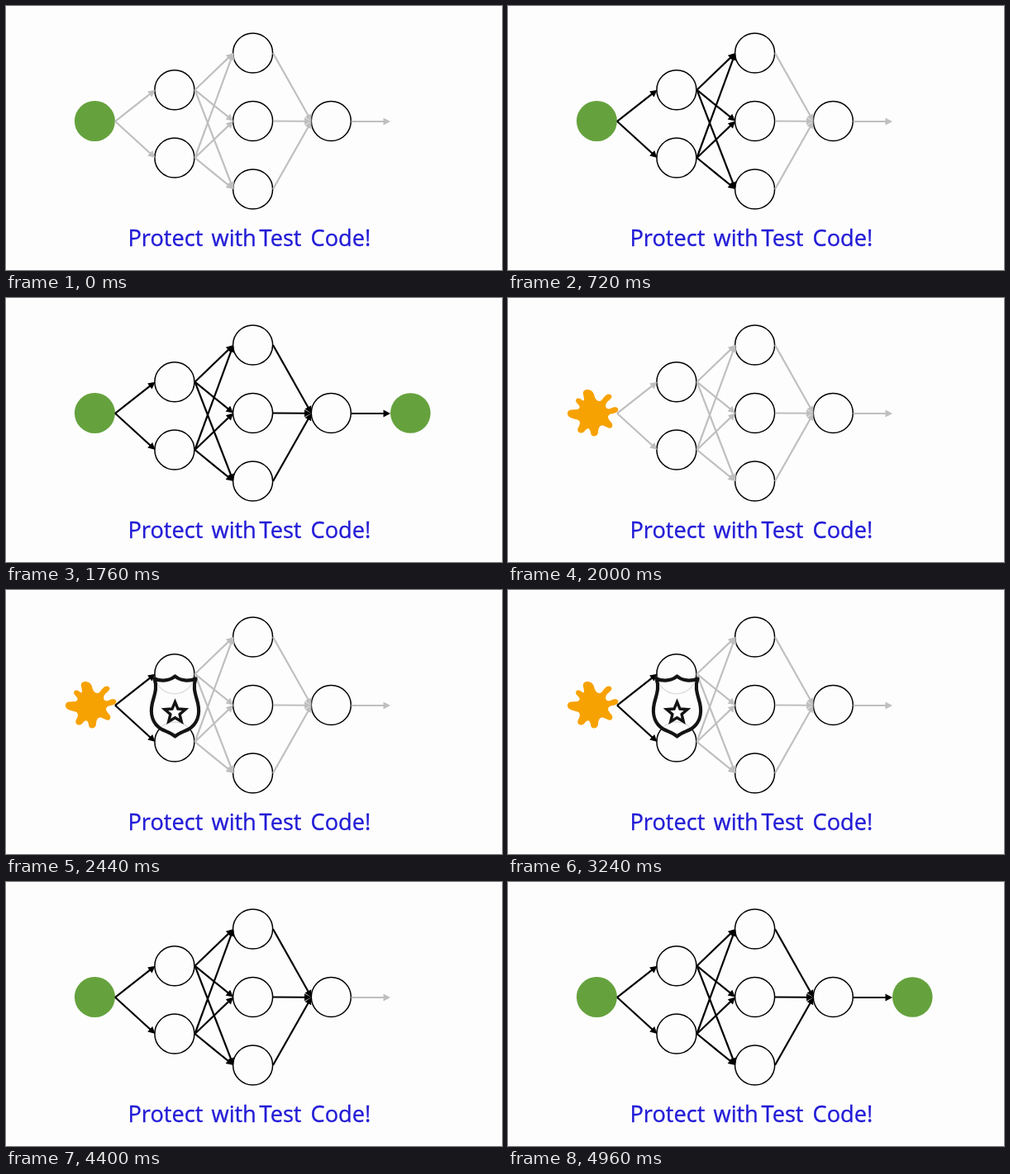
Write an HTML page that moves like this. It is 600 by 320 pixels and loops after 5000 ms.

```html
<!DOCTYPE html>
<html lang="en">
<head>
<meta charset="utf-8">
<title>Protect with Test Code</title>
<style>
  html, body { margin: 0; width: 100%; height: 100%; overflow: hidden; background: #fefdfe; }
  svg { display: block; width: 600px; height: 320px; }
  text { font: 27.2px "Open Sans", "Noto Sans", sans-serif; fill: #221cd6; stroke: #221cd6; stroke-width: .35; }

  .node { fill: #fefdfe; stroke: #000; stroke-width: 1.5; }
  .ok { fill: #65a23d; }
  .arrows { color: #bfbfbf; }
  .arrows path { fill: currentColor; stroke: currentColor; stroke-width: 2.2; }
  .arrows .head { stroke: none; }

  .arrows, .show { animation: 5s step-end infinite; }
  .show { visibility: hidden; }
  #first { animation-name: first; }
  #second { animation-name: second; }
  #third { animation-name: third; }
  #last { animation-name: last; }
  #good { animation-name: good; }
  #bad { animation-name: bad; }
  #shield { animation-name: shield; }
  #result { animation-name: result; }

  @keyframes first {
    0%, 36%, 65.6% { color: #bfbfbf; }
    4.8%, 41.6%, 72%, 100% { color: #000; }
  }
  @keyframes second { 0%, 36% { color: #bfbfbf; } 11.2%, 77.6%, 100% { color: #000; } }
  @keyframes third { 0%, 36% { color: #bfbfbf; } 17.6%, 84%, 100% { color: #000; } }
  @keyframes last { 0%, 36% { color: #bfbfbf; } 23.2%, 89.6%, 100% { color: #000; } }
  @keyframes good { 0%, 65.6%, 100% { visibility: visible; } 36% { visibility: hidden; } }
  @keyframes bad { 0%, 65.6%, 100% { visibility: hidden; } 36% { visibility: visible; } }
  @keyframes shield { 0%, 65.6%, 100% { visibility: hidden; } 48% { visibility: visible; } }
  @keyframes result { 0%, 36% { visibility: hidden; } 29.6%, 96%, 100% { visibility: visible; } }
</style>
</head>
<body>
<svg viewBox="0 0 600 320">
  <g id="nodes"></g>
  <circle id="good" class="ok show" cx="107.4" cy="139.5" r="24.5"/>
  <circle id="result" class="ok show" cx="489.3" cy="139.5" r="24.3"/>
  <g id="first" class="arrows"></g>
  <g id="second" class="arrows"></g>
  <g id="third" class="arrows"></g>
  <g id="last" class="arrows"></g>
  <path id="bad" class="show" fill="#f7a203" d="M91 117C89 109 102 109 104 117C105 123 110 128 114 123C117 119 120 115 124 117C128 120 123 123 120 126C116 131 119 136 124 134C130 130 136 133 132 138C128 141 122 139 121 144C121 149 128 151 126 156C124 160 119 156 116 155C111 153 109 158 109 163C108 169 100 169 100 163C99 157 96 157 93 161C89 166 82 163 85 157C88 152 88 148 82 147C77 146 71 144 72 139C73 134 79 136 84 135C89 133 86 130 83 127C80 122 85 119 90 124C93 126 92 121 91 117Z"/>
  <g id="shield" class="show" transform="translate(204.5 0)" stroke="#141414" stroke-linejoin="round">
    <path fill="#fefdfe" fill-opacity=".88" stroke-width="4.2" d="M0 104.5C-6 110-17 111-25 107.5C-21 118-25 127-27.5 137C-31 152-26 163-16 169C-10 172-5 173 0 177.5C5 173 10 172 16 169C26 163 31 152 27.5 137C25 127 21 118 25 107.5C17 111 6 110 0 104.5Z"/>
    <path id="star" fill="none" stroke-width="3.4" stroke-linejoin="miter"/>
  </g>
  <text y="291"><tspan x="147.5">Protect</tspan> <tspan x="248.5">with</tspan> <tspan x="306.5">Test</tspan> <tspan x="368.5">Code!</tspan></text>
</svg>
<script>
  const byId = id => document.getElementById(id);

  function add(parent, tag, attrs) {
    const el = document.createElementNS("http://www.w3.org/2000/svg", tag);
    for (const key in attrs) el.setAttribute(key, attrs[key]);
    byId(parent).append(el);
  }

  function arrow(parent, x1, y1, x2, y2) {
    const len = Math.hypot(x2 - x1, y2 - y1);
    const angle = Math.atan2(y2 - y1, x2 - x1) * 180 / Math.PI;
    const transform = `translate(${x1} ${y1}) rotate(${angle})`;
    add(parent, "path", { transform, d: `M0 0H${len - 6}` });
    add(parent, "path", { transform, class: "head", d: `M${len} 0l-8.5-4.4v8.8z` });
  }

  const mid = 139.8;
  const pair = [101.7, 184];
  const trio = [57, 139.5, 222];

  const node = (cx, cy) => add("nodes", "circle", { class: "node", cx, cy, r: 24 });
  pair.forEach(y => node(203.9, y));
  trio.forEach(y => node(298.6, y));
  node(393.3, 139.5);

  for (const y of pair) {
    arrow("first", 132, mid, 180.5, y);
    for (const to of trio) arrow("second", 228.5, y, 275, to);
  }
  for (const y of trio) arrow("third", 323, y, 369.5, mid);
  arrow("last", 417.5, mid + .2, 465, mid + .2);

  const points = Array.from({ length: 10 }, (_, i) => {
    const r = i % 2 ? 5.9 : 13.2, a = i * Math.PI / 5;
    return `${r * Math.sin(a)} ${148.8 - r * Math.cos(a)}`;
  });
  byId("star").setAttribute("d", `M${points.join("L")}Z`);
</script>
</body>
</html>
```
